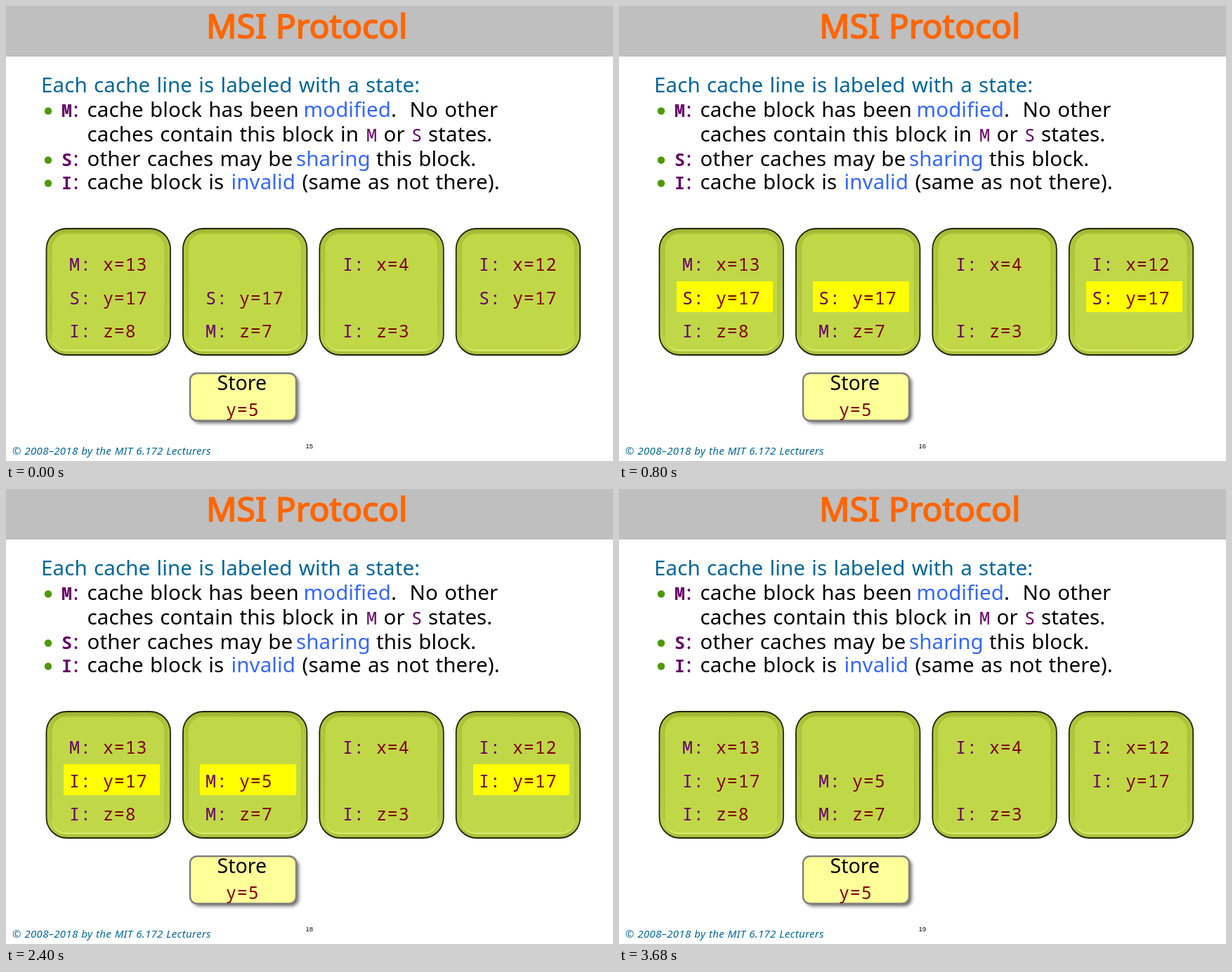
Animation, 864 px wide and 648 px high, one loop 4 s. Source, as an HTML page with a canvas:

```html
<!DOCTYPE html>
<html lang="en">
<head>
<meta charset="utf-8">
<title>MSI Protocol</title>
<style>
  html, body { margin: 0; width: 100%; height: 100%; overflow: hidden; background: #fff; }
  canvas { display: block; }
</style>
</head>
<body>
<canvas id="stage" width="864" height="648"></canvas>
<script>
const ctx = document.getElementById("stage").getContext("2d");
const STEP_MS = 800;
const STEPS = 5;
const SANS = '"Noto Sans", "Open Sans", sans-serif';
const MONO = '"Noto Sans Mono", "DejaVu Sans Mono", monospace';
const BODY = `29.5px ${SANS}`;
const CODE = `25px ${MONO}`;
const PURPLE = "#660066", MAROON = "#800000", BLUE = "#3366ff", TEAL = "#006699";
const ROWS = [377, 424.5, 471.5];

function text(str, x, y, color = "#000", font = BODY, letter = 0, word = 0) {
  ctx.font = font;
  ctx.letterSpacing = letter + "px";
  ctx.wordSpacing = word + "px";
  ctx.fillStyle = color;
  ctx.fillText(str, x, y);
}

const body = (str, x, y, color) => text(str, x, y, color, BODY, 0.1, 1.5);
const code = (str, x, y, color) => text(str, x, y, color, CODE, 0.85);

function roundRect(x, y, w, h, r) {
  ctx.beginPath();
  ctx.roundRect(x, y, w, h, r);
}

function drawTitle() {
  ctx.fillStyle = "#bfbfbf";
  ctx.fillRect(0, 0, 864, 72);
  text("MSI Protocol", 285, 45.5, "#ff6600", `48px ${SANS}`);
  ctx.strokeStyle = "#ff6600";
  ctx.lineWidth = 1.7;
  ctx.lineJoin = "round";
  ctx.strokeText("MSI Protocol", 285, 45.5);
}

function drawBullet(letter, y) {
  ctx.fillStyle = "#4e9a06";
  ctx.beginPath();
  ctx.arc(60, y - 8.5, 5.2, 0, Math.PI * 2);
  ctx.fill();
  text(letter, 79, y, PURPLE, `bold ${CODE}`);
  body(":", 95.5, y, PURPLE);
}

function drawNotes() {
  body("Each cache line is labeled with a state:", 50, 122.5, TEAL);

  drawBullet("M", 158);
  body("cache block has been", 115.5, 158);
  body("modified", 423.5, 158, BLUE);
  body(".", 548, 158);
  body("No other", 574.5, 158);

  body("caches contain this block in", 115.5, 192.5);
  code("M", 513, 192.5, PURPLE);
  body("or", 537.5, 192.5);
  code("S", 577, 192.5, PURPLE);
  body("states.", 601, 192.5);

  drawBullet("S", 228);
  body("other caches may be", 115.5, 228);
  body("sharing", 413, 228, BLUE);
  body("this block.", 527, 228);

  drawBullet("I", 261);
  body("cache block is", 115.5, 261);
  body("invalid", 320.5, 261, BLUE);
  body("(same as not there).", 421.5, 261);
}

function drawCacheBox(x) {
  const rim = ctx.createLinearGradient(0, 317, 0, 497);
  rim.addColorStop(0, "#9db12f");
  rim.addColorStop(0.06, "#afc53a");
  rim.addColorStop(0.9, "#b9d042");
  rim.addColorStop(1, "#a9bf38");
  roundRect(x + 0.5, 317, 176.5, 180, 29);
  ctx.fillStyle = rim;
  ctx.fill();
  ctx.strokeStyle = "#20260a";
  ctx.lineWidth = 1.8;
  ctx.stroke();

  roundRect(x + 7.5, 323.5, 162, 167, 21);
  ctx.fillStyle = "#c0d848";
  ctx.fill();
  const bevel = ctx.createLinearGradient(0, 323, 0, 491);
  bevel.addColorStop(0, "#a9c037");
  bevel.addColorStop(0.85, "#abc23a");
  bevel.addColorStop(1, "#dded70");
  ctx.strokeStyle = bevel;
  ctx.lineWidth = 2;
  ctx.stroke();
}

function drawEntry(x, row, entry, highlighted) {
  if (!entry) return;
  if (highlighted) {
    ctx.fillStyle = "#ffff00";
    ctx.fillRect(x + 25, 392, 137, 44);
  }
  const [state, value] = entry.split(" ");
  code(state, x + 33, ROWS[row], PURPLE);
  code(value, x + 81, ROWS[row], MAROON);
}

function drawCaches(step) {
  const peer = step < 2 ? "S: y=17" : "I: y=17";
  const writer = step < 3 ? "S: y=17" : "M: y=5";
  const caches = [
    ["M: x=13", peer, "I: z=8"],
    ["", writer, "M: z=7"],
    ["I: x=4", "", "I: z=3"],
    ["I: x=12", peer, ""],
  ];
  const marking = step >= 1 && step <= 3;
  caches.forEach((entries, i) => {
    const x = 57 + i * 194.4;
    drawCacheBox(x);
    entries.forEach((entry, row) => drawEntry(Math.round(x), row, entry, marking && row === 1));
  });
}

function drawStore() {
  ctx.save();
  ctx.shadowColor = "rgba(0, 0, 0, 0.6)";
  ctx.shadowBlur = 5;
  ctx.shadowOffsetX = 3.5;
  ctx.shadowOffsetY = 3.5;
  roundRect(262, 523, 151, 67.5, 10);
  ctx.fillStyle = "#ffff99";
  ctx.fill();
  ctx.restore();
  ctx.strokeStyle = "#7f7f7f";
  ctx.lineWidth = 2.4;
  ctx.stroke();
  text("Store", 300.5, 547, "#000", `28.5px ${SANS}`);
  code("y=5", 313, 583.5, MAROON);
}

function drawFooter(step) {
  text("© 2008–2018 by the MIT 6.172 Lecturers", 9, 638.5, TEAL,
    `italic 15px ${SANS}`, 0.3, 0.5);
  text(String(15 + step), 426.5, 630, "#000", '9.5px "Liberation Sans", Arial, sans-serif');
}

function render(now) {
  const step = Math.floor(now / STEP_MS) % STEPS;
  ctx.fillStyle = "#fff";
  ctx.fillRect(0, 0, 864, 648);
  drawTitle();
  drawNotes();
  drawCaches(step);
  drawStore();
  drawFooter(step);
}

let start;
function tick(now) {
  start ??= now;
  render(now - start);
  requestAnimationFrame(tick);
}
render(0);
requestAnimationFrame(tick);
</script>
</body>
</html>
```
